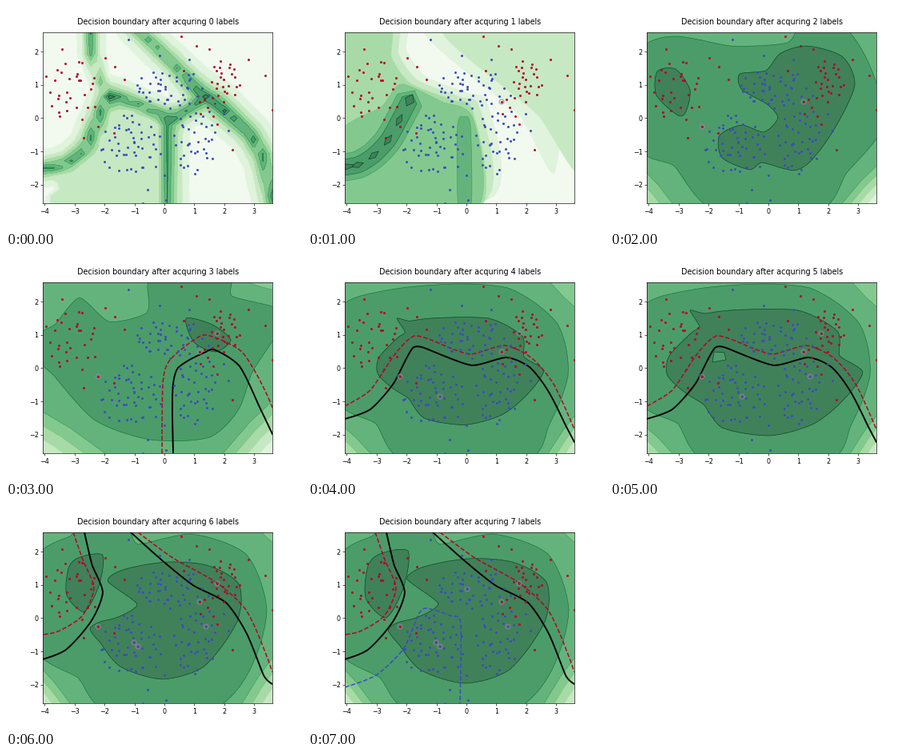
Animation of 370 by 278 pixels, one loop 8 s. Source, as a matplotlib script:

```python
import numpy as np
import matplotlib.pyplot as plt
from matplotlib.animation import FuncAnimation

W, H, DPI = 370, 278, 57.8125
LEFT, RIGHT, TOP, BOTTOM = 46.25, 333, 33.4, 247.4
RED, BLUE = "#b40426", "#3b4cc0"
GREENS = plt.get_cmap("Greens")


def fill_color(level):
    rgb = np.array(GREENS((level - 0.5) / 8)[:3])
    return tuple(0.75 * rgb + 0.25)


def line_color(level):
    return GREENS(max(level - 2, 0) / 6)


def refine(points, closed, rounds=3):
    """Interpolating subdivision: keeps the points, rounds the path."""
    p = np.array(points, float)
    for _ in range(rounds):
        if closed:
            q = np.vstack([p[-1:], p, p[:2]])
        else:
            q = np.vstack([2 * p[:1] - p[1:2], p, 2 * p[-1:] - p[-2:-1]])
        mid = 0.55 * (q[1:-2] + q[2:-1]) - 0.05 * (q[:-3] + q[3:])
        if closed:
            p = np.stack([p, mid], 1).reshape(-1, 2)
        else:
            p = np.vstack([np.stack([p[:-1], mid], 1).reshape(-1, 2), p[-1:]])
    return p


def region(points):
    """Closed smooth outline; points on the frame are pushed past it."""
    p = np.array(points, float)
    for axis, (low, high) in enumerate(((46, 333), (33, 247))):
        v = p[:, axis]
        p[:, axis] = np.where(v <= low, low - 9, np.where(v >= high, high + 9, v))
    return refine(p, True)


def shrink(points, k):
    p = np.array(points, float)
    return p.mean(axis=0) + k * (p - p.mean(axis=0))


def band(path, half):
    p = refine(path, False)
    d = np.gradient(p, axis=0)
    normal = np.stack([-d[:, 1], d[:, 0]], 1)
    normal *= half / np.hypot(*d.T)[:, None]
    cap = p[-1] + d[-1] / np.hypot(*d[-1]) * half * 0.8
    return np.vstack([p + normal, cap, (p - normal)[::-1]])


def diamond(center, direction, length, half):
    u = np.array(direction) / np.hypot(*direction)
    v = np.array([-u[1], u[0]])
    return np.array([center + length * u, center + half * v,
                     center - length * u, center - half * v])


# Samples: lone points plus clusters (count, center, radii)
ACQUIRED = [(242, 120), (115, 151), (264, 97), (165, 176), (250, 151),
            (160, 171), (199, 104)]
LONE_RED = [(136, 76), (148, 92), (124, 65), (135, 159), (97, 165), (219, 38),
            (238, 50), (254, 54), (303, 67), (324, 87), (333, 130), (283, 180),
            (264, 148), (222, 81)] + ACQUIRED[:3]
LONE_BLUE = [(153, 42), (192, 62), (229, 67), (171, 247), (200, 243),
             (177, 230), (198, 212), (278, 156), (272, 135),
             (236, 210)] + ACQUIRED[3:]
RED_CLUSTERS = [(32, (80, 104), (34, 44)), (24, (273, 94), (20, 26)),
                (4, (250, 128), (14, 16))]
BLUE_CLUSTERS = [(43, (202, 104), (45, 24)), (48, (156, 174), (38, 40)),
                 (36, (235, 168), (27, 40))]


def scatter_points(lone, clusters, seed):
    rng = np.random.default_rng(seed)
    parts = [np.array(lone, float)]
    for count, center, radii in clusters:
        i = np.arange(count)
        r = np.sqrt((i + 0.5) / count)
        a = i * np.pi * (3 - np.sqrt(5))
        spread = np.stack([r * np.cos(a), r * np.sin(a)], 1)
        spread += rng.normal(0, 0.1, spread.shape)
        parts.append(np.array(center) + spread * np.array(radii))
    return np.vstack(parts)


SAMPLES = [(RED, scatter_points(LONE_RED, RED_CLUSTERS, 3)),
           (BLUE, scatter_points(LONE_BLUE, BLUE_CLUSTERS, 8))]

# Uncertainty ridges: falloff, then nodes of x, y, height
RIDGES = [
    (13, [(46, 204, .86), (75, 198, .87), (100, 178, .87), (122, 125, .87),
          (130, 113, 1), (148, 117, .87), (170, 125, .8), (195, 137, .87),
          (208, 141, 1), (222, 133, .8), (242, 121, .9)]),
    (14, [(203, 141, .88), (203, 250, .84)]),
    (10, [(106, 25, .78), (107, 60, .77), (118, 95, .6), (128, 112, .8)]),
    (15, [(160, 25, .74), (210, 73, .78), (230, 95, .87), (245, 111, 1),
          (262, 121, 1), (305, 160, .87), (322, 190, .86), (336, 250, .85)])]


def ridge_field(xx, yy):
    plain = (xx < 203) & (yy > 125) & (yy > 330 - 1.6 * xx)
    best = np.where(plain, 0.31, 0.04)
    for falloff, nodes in RIDGES:
        for a, b in zip(np.array(nodes[:-1], float), np.array(nodes[1:], float)):
            d = b - a
            t = ((xx - a[0]) * d[0] + (yy - a[1]) * d[1]) / (d[:2] @ d[:2])
            t = np.clip(t, 0, 1)
            dist = np.hypot(xx - a[0] - t * d[0], yy - a[1] - t * d[1])
            reach = falloff * (0.6 + 0.4 * (a[2] + t * d[2]))
            best = np.maximum(best, (a[2] + t * d[2]) * np.exp(-dist / reach))
    return best


# Scenes: base level, shapes as (level, outline),
# corners as (right, bottom, width, height, steps)
SLOPE = np.array([(167, 33), (230, 90), (290, 140), (333, 210), (333, 33)])
SHELF = np.array([(46, 33), (103, 33), (104, 62), (128, 97), (185, 119),
                  (206, 132), (215, 247), (46, 247)])
CREST = [(36, 203), (62, 199), (82, 187), (100, 168), (114, 143), (127, 118)]


def split_scene():
    shapes = [(2, region(SLOPE - (24, 0))), (3, region(SLOPE))]
    inner = (SHELF[:, :1] > 46) * np.array([1.0, -0.5])
    shapes += [(4 - k, region(SHELF + inner * 9 * k)) for k in (2, 1, 0)]
    shapes += [
        (5, region([(46, 160), (90, 128), (105, 108), (120, 98), (170, 121),
                    (206, 140), (210, 247), (46, 247)])),
        (6, band(CREST, 17)),
        (6, region([(188, 247), (187, 150), (195, 139), (203, 150), (204, 247)])),
        (7, band(CREST, 10))]
    nodes = np.array(CREST, float)
    steps = np.gradient(nodes, axis=0)
    for i, (node, step) in enumerate(zip(nodes, steps)):
        end = i in (0, len(nodes) - 1)
        shapes.append((8, diamond(node, step, 26 if i == 0 else 8,
                                  6 if end else 3.5)))
    return dict(base=1, shapes=shapes, corners=[])


BLOBS = dict(base=6, shapes=[
    (7, region([(46, 58), (85, 38), (150, 50), (222, 46), (238, 33), (290, 33),
                (325, 75), (333, 150), (295, 210), (262, 247), (130, 247),
                (80, 200), (46, 178)])),
    (8, region([(59, 82), (82, 79), (100, 105), (95, 132), (85, 137),
                (58, 112)])),
    (8, region([(162, 85), (195, 81), (212, 60), (245, 50), (290, 63),
                (306, 100), (278, 158), (250, 195), (228, 206), (190, 196),
                (175, 205), (140, 190), (137, 162), (165, 149), (192, 158),
                (210, 140), (195, 122), (165, 105)]))],
    corners=[(0, 1, 32, 38, 2), (1, 1, 43, 47, 4)])

WIDE = dict(base=6, shapes=[
    (7, region([(46, 100), (62, 85), (92, 52), (128, 82), (175, 72), (178, 50),
                (185, 33), (278, 33), (282, 50), (333, 66), (333, 92),
                (308, 145), (292, 190), (255, 227), (180, 230), (110, 205),
                (60, 150), (46, 128)])),
    (8, region([(225, 78), (258, 86), (281, 105), (262, 120), (235, 108)]))],
    corners=[(0, 1, 78, 52, 3), (1, 0, 30, 9, 1), (1, 1, 62, 66, 4)])

DOME = region([(46, 72), (78, 47), (160, 36), (250, 40), (312, 85), (325, 150),
               (300, 215), (272, 247), (120, 247), (85, 210), (46, 182)])
CORE = region([(72, 150), (74, 125), (102, 96), (112, 88), (100, 68), (118, 72),
               (150, 68), (235, 68), (285, 95), (287, 125), (316, 145),
               (292, 180), (255, 210), (200, 225), (140, 215), (118, 187),
               (95, 172)])
HOLE = np.array([(128, 133), (130, 120), (143, 121), (145, 130)])
ARCH = dict(base=6, shapes=[(7, DOME), (8, CORE), (7, HOLE)],
            corners=[(0, 1, 32, 32, 2), (1, 0, 30, 30, 1), (1, 1, 33, 47, 3)])

RING = region([(46, 66), (80, 38), (95, 33), (150, 33), (165, 48), (230, 35),
               (300, 60), (326, 130), (305, 205), (255, 247), (125, 247),
               (90, 215), (46, 180)])
LOBE_L = region([(72, 115), (75, 75), (90, 60), (125, 56), (120, 100),
                 (98, 140)])
LOBE_R = region([(163, 122), (124, 92), (145, 76), (200, 66), (255, 70),
                 (298, 95), (296, 145), (252, 205), (195, 222), (140, 205),
                 (115, 175), (100, 155), (115, 145), (135, 140)])
FORK = dict(base=6, shapes=[(7, RING), (8, LOBE_L), (8, LOBE_R)],
            corners=[(0, 1, 34, 42, 3), (1, 0, 13, 12, 1), (1, 1, 38, 57, 3)])

ARCH_EARLY = dict(ARCH, shapes=[(7, DOME), (8, shrink(CORE, 0.85))])
FORK_EARLY = dict(FORK, shapes=[(7, RING), (8, shrink(LOBE_L, 0.85)),
                                (8, shrink(LOBE_R, 0.94))])
SCENES = [None, split_scene(), BLOBS, WIDE, ARCH_EARLY, ARCH, FORK_EARLY, FORK]

HOOK = [
    ("k", [(209, 247), (208, 175), (215, 140), (250, 120), (262, 118),
           (292, 138), (315, 185), (333, 223)]),
    (RED, [(195, 247), (196, 160), (205, 130), (238, 103), (255, 100),
           (295, 120), (322, 165), (333, 190)])]
WAVE = [
    ("k", [(46, 204), (78, 192), (108, 158), (131, 115), (155, 119),
           (205, 137), (247, 127), (278, 140), (302, 172), (322, 212),
           (333, 233)]),
    (RED, [(46, 188), (78, 168), (105, 128), (133, 100), (170, 112),
           (204, 123), (245, 112), (280, 128), (308, 162), (333, 217)])]
PAIR = [
    ("k", [(98, 33), (108, 75), (121, 108), (106, 145), (75, 180), (46, 192)]),
    ("k", [(156, 33), (195, 68), (235, 100), (275, 121), (302, 162),
           (322, 212), (333, 223)]),
    (RED, [(84, 33), (97, 70), (110, 103), (95, 138), (65, 157), (46, 161)]),
    (RED, [(165, 33), (210, 66), (262, 95), (300, 130), (322, 178),
           (333, 208)]),
    (BLUE, [(46, 227), (85, 212), (120, 178), (137, 138), (148, 128),
            (180, 138), (191, 148), (190, 247)])]
CURVES = [[], [], [], HOOK, WAVE, WAVE, PAIR[:4], PAIR]

fig = plt.figure(figsize=((W + 0.01) / DPI, (H + 0.01) / DPI), dpi=DPI)
ax = fig.add_axes([LEFT / W, 1 - BOTTOM / H, (RIGHT - LEFT) / W,
                   (BOTTOM - TOP) / H])


def draw_ridges():
    xx, yy = np.meshgrid(np.linspace(LEFT, RIGHT, 25),
                         np.linspace(TOP, BOTTOM, 25))
    z = ridge_field(xx, yy)
    levels = np.linspace(0, 1.0001, 9)
    ax.contourf(xx, yy, z, levels, colors=[fill_color(k) for k in range(1, 9)])
    ax.contour(xx, yy, z, levels[1:-1], linewidths=0.8,
               colors=[line_color(k) for k in range(2, 9)])


def draw_corner(right, bottom, width, height, steps):
    corner = np.array([(LEFT, RIGHT)[right], (TOP, BOTTOM)[bottom]])
    size = np.array([width * (1 - 2 * right), height * (1 - 2 * bottom)])
    for i in range(steps):
        k = 1 - i / steps
        arc = corner + k * size * np.array([(0, 1), (0.45, 0.6), (1, 0)])
        ax.fill(*np.vstack([arc, corner]).T, fc=fill_color(5 - i), lw=0)
        ax.plot(*arc.T, color=line_color(6 - i), lw=0.8)


def draw_scene(scene):
    ax.set_facecolor(fill_color(scene["base"]))
    below = scene["base"]
    for level, outline in scene["shapes"]:
        ax.fill(*outline.T, fc=fill_color(level), lw=0.8,
                ec=line_color(max(level, below)))
        below = level
    for corner in scene["corners"]:
        draw_corner(*corner)


def draw(n):
    ax.clear()
    if SCENES[n] is None:
        draw_ridges()
    else:
        draw_scene(SCENES[n])
    for color, points in CURVES[n]:
        solid = color == "k"
        ax.plot(*refine(points, False).T, color=color, zorder=3,
                lw=2.4 if solid else 1.9, ls="-" if solid else "--")
    for color, points in SAMPLES:
        ax.scatter(*points.T, s=14, color=color, lw=0, zorder=4)
    if n:
        ax.scatter(*np.array(ACQUIRED[:n]).T, s=52, fc="none", ec="#a080a0",
                   lw=1.6, alpha=0.75, zorder=5)
    ax.set_xlim(LEFT, RIGHT)
    ax.set_ylim(BOTTOM, TOP)
    xs, ys = range(-4, 4), range(-2, 3)
    ax.set_xticks([198 + 37.4 * v for v in xs],
                  [str(v).replace("-", "\u2212") for v in xs])
    ax.set_yticks([140.5 - 41.7 * v for v in ys],
                  [str(v).replace("-", "\u2212") for v in ys])
    ax.set_title(f"Decision boundary after acquring {n} labels", pad=12.5)
    return []


anim = FuncAnimation(fig, draw, frames=8, interval=1000, repeat=True,
                     repeat_delay=0, blit=False)
plt.show()
```
